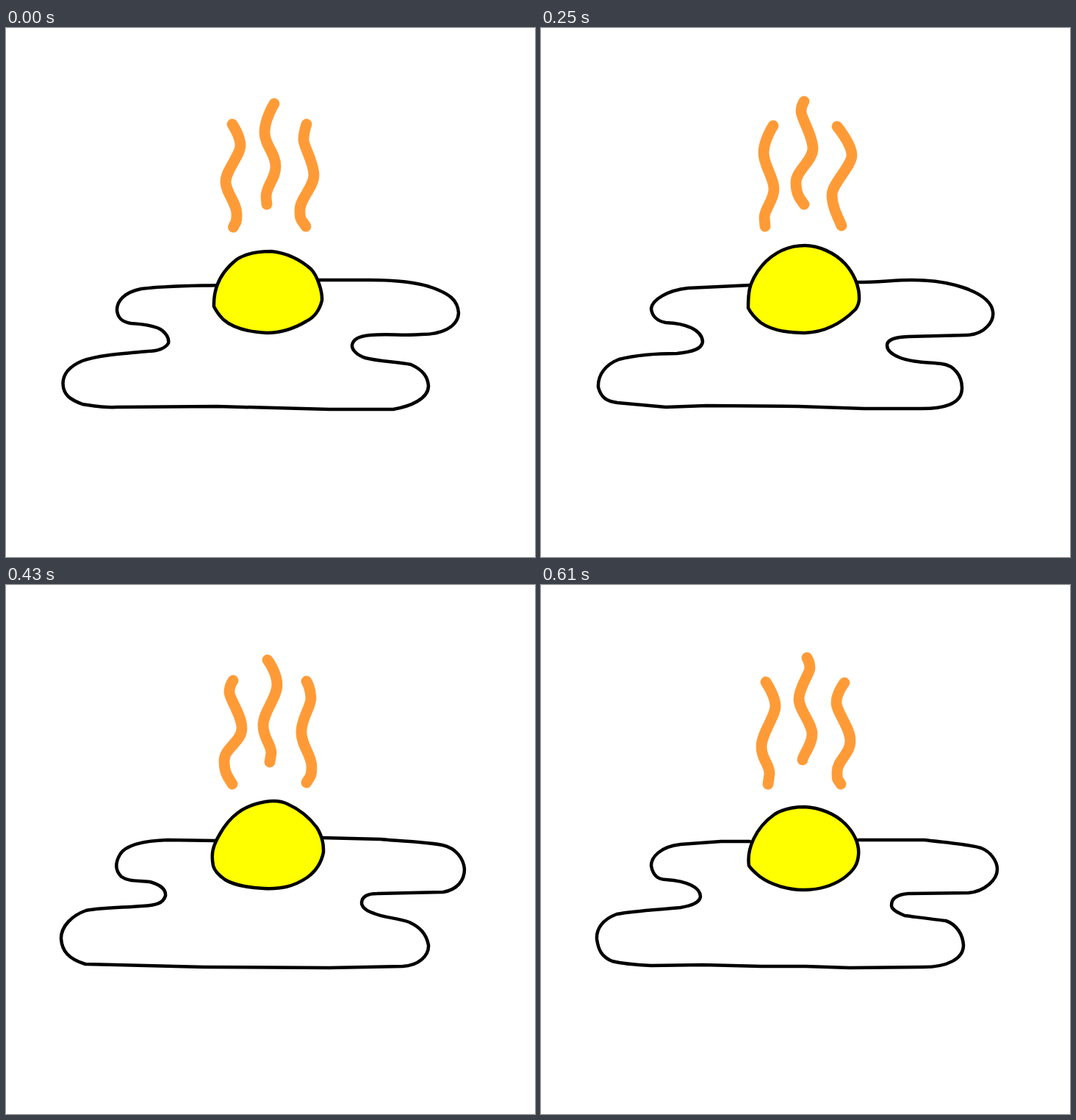
An HTML page without scripts that plays this animation: 720 px wide and 720 px high, repeating every 0.67 s.

```html
<!DOCTYPE html>
<html lang="en">
<head>
<meta charset="utf-8">
<title>Hot fried egg</title>
<style>
  html, body { margin: 0; width: 100%; height: 100%; overflow: hidden; background: #fff; }
  svg { display: block; width: 100%; height: 100%; overflow: hidden; }
  path { stroke-linecap: round; stroke-linejoin: round; }
  .white { fill: #fff; stroke: #000; stroke-width: 4.5; }
  .yolk { fill: #ff0; stroke: #000; stroke-width: 4.5; }
  .steam { fill: none; stroke: #ff9b37; stroke-width: 14.8; }

  /* The drawings sit side by side and the strip jumps one stage at a time. */
  .strip { animation: flip 670ms step-end infinite; }
  @keyframes flip {
    0% { transform: translateX(0); }
    8.95% { transform: translateX(-720px); }
    17.91% { transform: translateX(-1440px); }
    37.31% { transform: translateX(-2160px); }
    46.26% { transform: translateX(-2880px); }
    55.22% { transform: translateX(-3600px); }
    64.17% { transform: translateX(-4320px); }
    73.13% { transform: translateX(-5040px); }
    82.08% { transform: translateX(-5760px); }
    91.04%, 100% { transform: translateX(-6480px); }
  }
</style>
</head>
<body>
<svg viewBox="0 0 720 720" role="img" aria-label="Steaming fried egg">
  <defs>
    <path id="white-a" class="white" d="M292 350C262 351 214 351 184 355C160 360 151 372 151 384C152 395 158 400 170 402C186 403 206 406 213 412C220 418 222 424 221 429C217 436 206 440 193 440C160 443 126 445 104 453C85 461 77.500 472 77.500 484C78 500 88 506 104 512C118 514 134 517 150 516L287 515L440 519H527C550 515 575 505 575 487C574 476 569 466 551 458C533 454 507 454 489 449C477 445 471 438 471 432C472 423 483 419 496 418C520 416 541 419 566 417C593 417 615 407 616 388C615 370 603 362 582 354C555 344 521 343 495 343H422"/>
    <path id="white-b" class="white" d="M290 348L200 354.500C175 358 153 370 153 384C154 395 162 401 177 402C200 406 219 412 219 425C219 434 208 439 190 442C160 445 130 445 111 450C90 456 77 470 77 487C77 499 87 509 100 512L125 513C145 516 160 516 180 516L300 515L400 518H514C550 518 573 509 573 489C573 476 565 463 550 459C530 455 508 455 490 449C478 445 470 439 470 434C471 423 486 421 505 420C525 418 550 418 585 417C603 415 615 402 614 386C614 373 603 365 587 357C563 345 538 343 513 343L430 347"/>
    <path id="white-c" class="white" d="M285 350L200 354C172 357 151 370 150 382C151 392 158 399 170 401C196 402 219 410 220 427C219 437 206 441 185 443C160 443 130 445 106 451C88 458 77 472 78 489C82 504 90 508 104 510L170 516L225 514L350 515L440 518H512C548 519 573 512 573 490C573 474 563 459 545 457C525 455 503 455 487 448C475 443 471 438 471 432C471 425 478 421 500 420L580 418C604 417 617 399 615 386C613 371 598 361 574 353C550 345 530 343 505 343C480 343 460 346 430 346"/>
    <path id="white-d" class="white" d="M284 349H245L190 353C163 356 150 370 150 382C152 394 158 401 170 401C200 403 217 412 217 424C216 432 207 436 190 439C160 442 130 443 103 448C84 455 75 468 76 482C78 496 82 506 97 512C113 516 130 517 150 518L220 517L300 519H360L420 521L520 520C553 520 575 509 575 490C574 476 566 462 551 457C533 455 511 452 495 450C483 445 477 441 477 436C477 425 486 421 500 420L582 419C604 417 621 401 621 387C621 376 612 363 599 358C583 353 550 350 521 347H432"/>
    <path id="white-e" class="white" d="M285 348L220 347C190 348 163 353 155 367C148 379 149 389 157 397C167 404 180 402 196 404C210 408 218 414 217 423C214 433 205 436 185 437C160 439 130 439 109 443C89 450 75 465 75 481C76 498 85 509 108 516L150 517L270 520L440 521L540 519C561 518 576 505 575 490C572 475 564 466 549 459C533 453 515 453 501 447C489 443 484 438 484 432C485 423 493 420 505 420L595 418C613 415 624 403 624 387C623 372 612 358 594 354C568 349 540 349 510 346L430 344"/>
    <path id="white-f" class="white" d="M288 348L205 349C176 352 150 364 150 381C153 394 158 402 172 402L195 404C207 404 215 413 215 424C213 433 205 437 190 438C160 439 140 440 115 443C91 449 76 464 76 482C77 501 96 514 115 516L160 517L230 519L340 522L440 520H520C540 518 556 519 563 511C570 505 574 498 573 490C573 478 566 466 554 460C535 455 515 454 494 448C485 446 480 440 480 435C481 425 490 421 505 421L580 420C604 418 621 401 621 384C620 369 605 357 578 352C555 351 540 347 495 347L430 349"/>

    <path id="yolk-a" class="yolk" d="M283 379C282 350 295 330 314 315C326 307 344 304 361 304C381 306 400 315 415 328C424 337 431 360 430 371C427 383 421 393 409 399C394 408 374 415 355 415C335 414 311 410 296 397Q288 389 283 379Z"/>
    <path id="yolk-b" class="yolk" d="M283 377C280 350 298 325 317 311C330 302 345 299 359 299C376 299 396 307 412 321C424 333 434 349 432 370C431 381 424 391 417 396C402 404 379 413 361 414C339 415 316 410 301 400Q289 391 283 377Z"/>
    <path id="yolk-c" class="yolk" d="M282 381C282 360 283 349 295 331C308 312 330 296 359 296C378 296 400 306 414 321C424 332 434 350 433 370Q432 378 428 383C412 399 390 414 359 415C335 415 313 411 299 401Q287 391 282 381Z"/>
    <path id="yolk-d" class="yolk" d="M282 377C277 357 282 341 295 325C310 306 333 292 358 292C379 292 399 302 414 316C425 328 432 344 431 356C432 368 429 382 417 393C401 407 382 414 361 414C338 415 313 411 298 400Q285 391 282 377Z"/>
    <path id="yolk-e" class="yolk" d="M282 382C279 366 281 356 291 339C304 316 322 300 353 295C365 293 375 294 383 298C401 306 414 318 423 330Q433 346 432 364C429 379 421 390 410 398C391 411 373 414 351 413C331 412 309 408 298 401Q284 391 282 382Z"/>
    <path id="yolk-f" class="yolk" d="M283 382C280 360 291 331 318 312C331 304 345 302 359 302C379 303 400 311 414 325C424 335 434 351 432 368C431 381 425 389 412 399C396 410 379 415 357 415C336 415 313 408 298 397Q287 388 283 382Z"/>
  </defs>

  <g class="strip">
    <g>
      <use href="#white-a"/><use href="#yolk-a"/>
      <path class="steam" d="M308 131S319 147 319 160S299 194 299 209S314 238 314 253S312 264 309.500 271M365 103S352 124 352 142S367 170 367 188S354 214 354 230L355 240M409 131S405 143 405 152S419 183 419 200S400 232 400 248S403 261 408 270"/>
    </g>
    <g transform="translate(720)">
      <use href="#white-b"/><use href="#yolk-f"/>
      <path class="steam" d="M310 130S318 140 318 151S300 182 300 196S317 229 317 244S313 260 308 270M362 102S353 117 353 131S368 161 368 178S352 212 352 230L356 240M405 134S404 140 405 143S420 174 420 192S398 228 398 244S401 262 406 270"/>
    </g>
    <g transform="translate(1440)">
      <use href="#white-b"/><use href="#yolk-b"/>
      <path class="steam" d="M312 128S316 134 316 142S301 168 301 183S319 217 319 234S312 256 306 269M360 101S354 110 355 121S369 151 369 168S350 202 350 220S352 232 358 240M402 136S420 165 420 184S396 222 396 240S400 262 405 270"/>
    </g>
    <g transform="translate(2160)">
      <use href="#white-c"/><use href="#yolk-c"/>
      <path class="steam" d="M316 133S303 153 303 170S317 203 317 219S304 246 304 258L305 270M358 100S354 106 354 114S370 147 370 164S347 194 347 210S352 232 358 240M403 134S423 158 423 173S396 212 396 227S403 255 409 269"/>
    </g>
    <g transform="translate(2880)">
      <use href="#white-c"/><use href="#yolk-e"/>
      <path class="steam" d="M312 132S304 147 304 160S318 192 318 210S302 240 302 258L306 270M356 102S372 138 372 153S347 189 347 204S353 229 358 240M405 132S421 152 421 167S397 203 397 218S409 247 410 270"/>
    </g>
    <g transform="translate(3600)">
      <use href="#white-d"/><use href="#yolk-d"/>
      <path class="steam" d="M309 131S305 141 305 150S319 180 319 200S300 233 300 249S303 263 308 271M353 104S373 129 373 143S347 183 347 199S354 223 359 239M408 131S418 146 418 160S399 194 399 210S413 238 413 253S412 264 409 271"/>
    </g>
    <g transform="translate(4320)">
      <use href="#white-e"/><use href="#yolk-e"/>
      <path class="steam" d="M309 130S304 137 304 146S321 177 321 195S297 222 297 239S302 261 308 271M356 102S369 119 369 136S350 173 350 191S361 216 361 229L359 241M409 131S415 141 415 154S402 181 402 200S416 231 416 247S413 261 409 269"/>
    </g>
    <g transform="translate(5040)">
      <use href="#white-e"/><use href="#yolk-c"/>
      <path class="steam" d="M306 132S322 167 322 184S296 218 296 234S302 257 308 270M358 101S367 115 367 129S351 163 351 181S364 210 363 229L359 240M412 132S415 138 413 146S402 168 402 185S416 217 416 233L407 270"/>
    </g>
    <g transform="translate(5760)">
      <use href="#white-f"/><use href="#yolk-b"/>
      <path class="steam" d="M303 134S323 158 323 173S296 214 296 230S303 253 309 269M359 101S365 111 365 123S352 152 352 170S366 201 366 217S363 231 359 240M415 133S403 153 403 170S417 203 417 219S404 245 404 257L405 270"/>
    </g>
    <g transform="translate(6480)">
      <use href="#white-d"/><use href="#yolk-f"/>
      <path class="steam" d="M306 132S319 151 319 165S300 202 300 220S311 243 311 257L309 271M362 99S366 106 366 113S351 140 351 155S369 188 369 203S357 230 356 238M413 133S402 147 402 160S421 194 421 212S403 239 403 254S404 263 408 271"/>
    </g>
  </g>
</svg>
</body>
</html>
```
